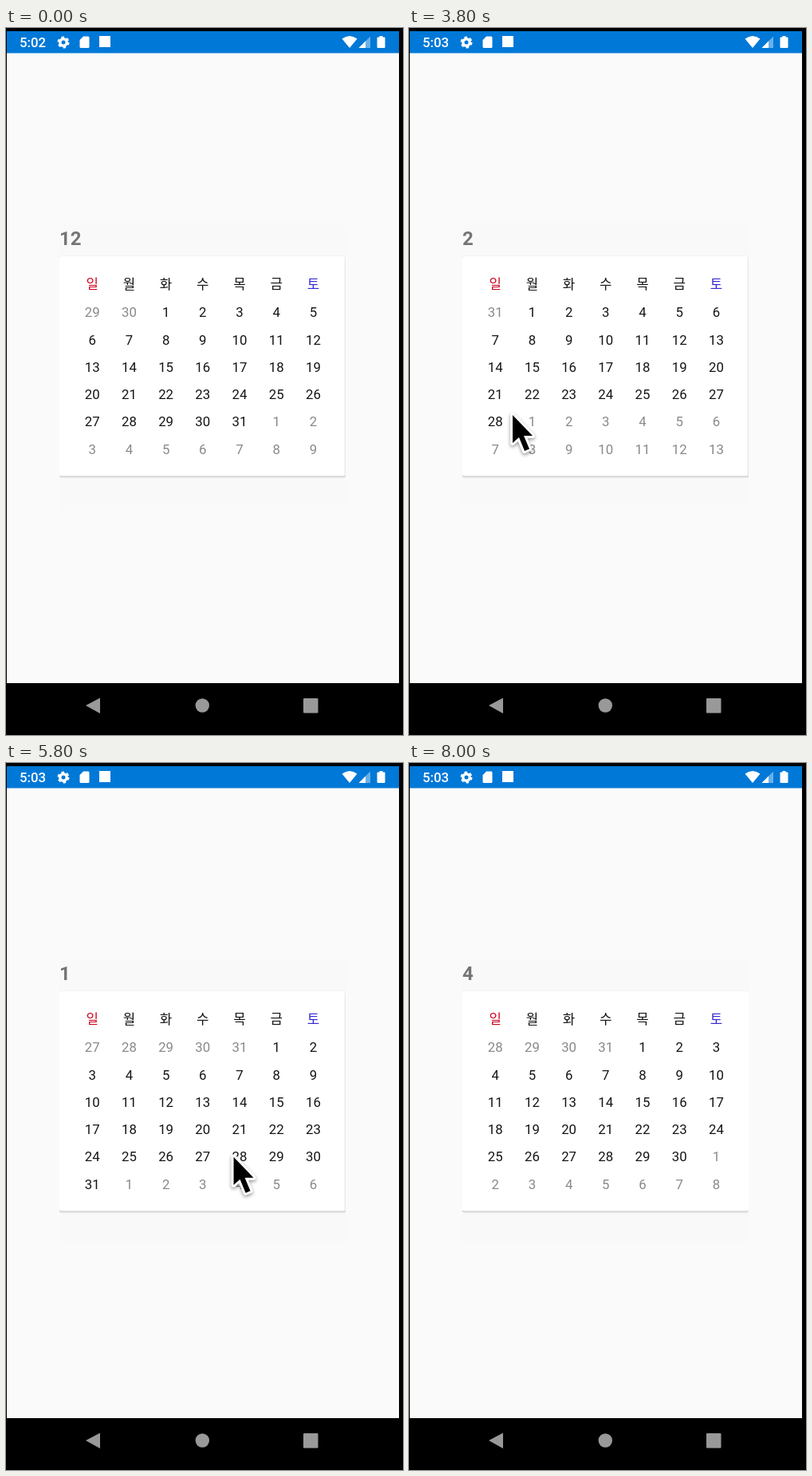
These frames come from a looping animation (498x886 px, 8700 ms). An HTML page:

```html
<!DOCTYPE html>
<html lang="ko">
<head>
<meta charset="utf-8">
<title>Calendar pager</title>
<style>
  html, body { margin: 0; width: 100%; height: 100%; overflow: hidden; background: #000; }
  svg { display: block; }
  text { font-family: Roboto, "Noto Sans CJK KR", "Noto Sans CJK", sans-serif; font-size: 16.8px; }
  .day { text-anchor: middle; fill: #151515; }
  .other { fill: #898989; }
  .sun { fill: #cc0820; }
  .sat { fill: #3428d4; }
  .title { font-size: 24px; font-weight: 700; fill: #757575; }
  .card { fill: #fff; filter: drop-shadow(0 1px 1px rgba(0, 0, 0, .27)); }
  #clock { font-weight: 500; fill: #fff; }
  #cursor { filter: drop-shadow(0 2px 2px rgba(0, 0, 0, .4)); }
</style>
</head>
<body>
<svg width="498" height="886" viewBox="0 0 498 886">
  <rect width="498" height="886"/>
  <rect x="1" y="4" width="492" height="817" fill="#fafafa"/>
  <rect x="1" y="4" width="492" height="27.5" fill="#0078d7"/>

  <g fill="#fff">
    <text id="clock" x="17" y="24"></text>
    <circle cx="72" cy="18" r="4.2" fill="none" stroke="#fff" stroke-width="3.4"/>
    <circle cx="72" cy="18" r="6.3" fill="none" stroke="#fff" stroke-width="2.4" stroke-dasharray="3.4 3.2"/>
    <path d="M97 10.5h6q1.5 0 1.5 1.5v11.500q0 1.500-1.500 1.500h-9q-1.500 0-1.500-1.500v-8.500z"/>
    <rect x="117" y="10" width="14" height="14"/>
    <path d="M421.500 13.500Q431 6.500 440.500 13.500L431 25z"/>
    <path d="M457 10.500V25H442.500z" fill="#68b0e8"/>
    <path d="M451 16.500V25H442.500z"/>
    <path d="M468.500 11.500V10h4v1.500h2q1 0 1 1V24q0 1-1 1h-8q-1 0-1-1V12.500q0-1 1-1z"/>
  </g>

  <svg x="67" y="247" width="359" height="357">
    <rect width="359" height="357" fill="#f9f9f9"/>
    <g id="pages"></g>
  </svg>

  <g fill="#999">
    <path d="M100 849L118 839.500V859z"/>
    <circle cx="246.300" cy="849" r="8.700"/>
    <rect x="373" y="840" width="18.500" height="18.500" rx="1"/>
  </g>

  <path id="cursor" d="M0 0V35L8 28L15 45L21 42.500L14 26H25z"
    stroke="#fff" stroke-width="6" stroke-linejoin="round" paint-order="stroke"/>
</svg>

<script>
const LOOP = 8700, STEP = 100, PAGE = 359, CLOCK_TICK = 2500;
const SHOW = 100, HIDE = 8000;
const byId = id => document.getElementById(id);

// Swipes: start, end, page reached
const swipes = [
  [2000, 2600, 1], [3200, 3700, 2], [3800, 4300, 1], [4510, 5200, 0],
  [5300, 5800, 1], [5900, 6400, 2], [6570, 7200, 3], [7400, 8000, 4]
];

// Pointer path: time, x, y
const path = [
  [100, 300, 502], [500, 150, 470], [900, 150, 470], [1400, 104, 475],
  [1700, 104, 475], [2000, 330, 490], [2300, 140, 488], [2600, 140, 488],
  [3000, 267, 490], [3200, 340, 490], [3500, 130, 485], [3800, 130, 485],
  [4100, 345, 490], [4500, 120, 488], [5000, 359, 490], [5300, 350, 490],
  [5600, 130, 490], [5900, 340, 495], [6200, 140, 495], [6550, 226, 500],
  [6700, 183, 503], [6900, 100, 500], [7400, 100, 500], [7500, 330, 500],
  [7800, 120, 500], [8000, 120, 500]
];

const text = (cls, x, y, s) => `<text class="${cls}" x="${x}" y="${y}">${s}</text>`;

function monthPage(i) {
  const month = new Date(2020, 11 + i, 1);
  let out = text("title", 0, 24.5, month.getMonth() + 1)
    + `<rect class="card" y="39" width="${PAGE}" height="275.5" rx="2.5"/>`;
  const colX = c => 41.2 + 46.2 * c;
  [..."일월화수목금토"].forEach((name, c) => {
    out += text("day " + (["sun"][c] || (c === 6 ? "sat" : "")), colX(c), 80.3, name);
  });
  for (let n = 0; n < 42; n++) {
    const date = new Date(2020, 11 + i, 1 - month.getDay() + n);
    const cls = date.getMonth() === month.getMonth() ? "day" : "day other";
    out += text(cls, colX(n % 7), 115.2 + 34.3 * Math.floor(n / 7), date.getDate());
  }
  return `<g transform="translate(${i * PAGE})">${out}</g>`;
}

const smooth = u => u * u * (3 - 2 * u);

function pageAt(t) {
  let page = 0;
  for (const [start, end, to] of swipes) {
    if (t <= start) break;
    page += (to - page) * smooth(Math.min(1, (t - start) / (end - start)));
  }
  return page;
}

function pointerAt(t) {
  const k = Math.max(1, path.findIndex(p => p[0] >= t));
  const [t0, x0, y0] = path[k - 1], [t1, x1, y1] = path[k];
  const u = smooth((t - t0) / (t1 - t0));
  return [x0 + (x1 - x0) * u, y0 + (y1 - y0) * u];
}

function draw(now) {
  const t = Math.floor((now % LOOP) / STEP) * STEP;
  byId("pages").setAttribute("transform", `translate(${Math.round(-PAGE * pageAt(t))})`);
  byId("clock").textContent = t < CLOCK_TICK ? "5:02" : "5:03";
  const visible = t >= SHOW && t < HIDE;
  byId("cursor").setAttribute("visibility", visible ? "visible" : "hidden");
  if (visible) byId("cursor").setAttribute("transform", `translate(${pointerAt(t)})`);
}

byId("pages").innerHTML = [0, 1, 2, 3, 4].map(monthPage).join("");
const begin = performance.now();
function tick() {
  draw(performance.now() - begin);
  requestAnimationFrame(tick);
}
tick();
</script>
</body>
</html>
```
